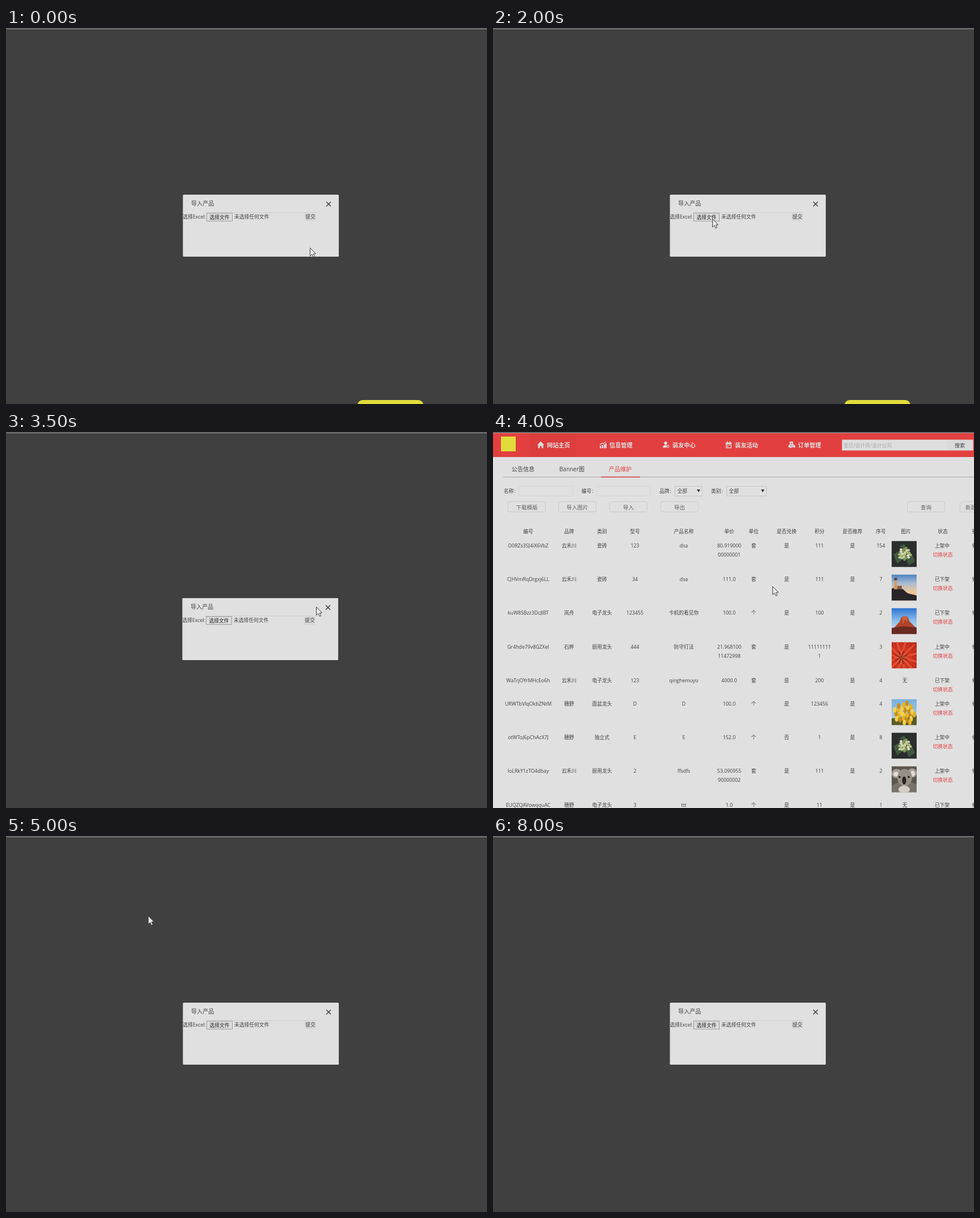
Recreate the animation shown at these times as an HTML page. Size 847 px wide and 661 px high, loop 9 s.

```html
<!DOCTYPE html>
<html lang="zh-CN">
<head>
<meta charset="utf-8">
<title>导入产品</title>
<style>
  html, body { margin: 0; width: 100%; height: 100%; overflow: hidden; background: #404040; }
  svg { display: block; }
  text { font-family: "Open Sans", "Noto Sans CJK SC", "Noto Sans CJK JP", "Noto Sans CJK", sans-serif; white-space: pre; }
</style>
</head>
<body>
<svg id="stage" width="847" height="661" viewBox="0 0 847 661"></svg>
<script>
const INK = '#404040', PAPER = '#e0e0e0', RED = '#e24040', FAINT = '#cacaca';

const rect = (x, y, w, h, fill, extra = '') =>
  `<rect x="${x}" y="${y}" width="${w}" height="${h}" fill="${fill}" ${extra}/>`;
const box = (x, y, w, h, stroke = FAINT, extra = '') =>
  rect(x + .5, y + .5, w - 1, h - 1, 'none', `stroke="${stroke}" ${extra}`);
const path = (d, fill, extra = '') => `<path d="${d}" fill="${fill}" ${extra}/>`;
const oval = (cx, cy, rx, ry, fill, extra = '') =>
  `<ellipse cx="${cx}" cy="${cy}" rx="${rx}" ry="${ry}" fill="${fill}" ${extra}/>`;
// y is the vertical middle of the line
const text = (x, y, str, size = 8.75, fill = INK, extra = '') =>
  `<text x="${x}" y="${y + size * .37}" font-size="${size}" fill="${fill}" ${extra}>${str}</text>`;
const centered = (x, y, str, size, fill, extra = '') => text(x, y, str, size, fill, `text-anchor="middle" ${extra}`);
const repeat = (count, draw) => Array.from({ length: count }, (_, i) => draw(i, i * 360 / count)).join('');
const gradient = (id, ...colors) => `<linearGradient id="${id}" x2="0" y2="1">${
  colors.map((color, i) => `<stop offset="${i / (colors.length - 1)}" stop-color="${color}"/>`).join('')}</linearGradient>`;
// Spiral of n small blobs around a centre
const cluster = (n, cx, cy, spread, rx, ry, colors) => repeat(n, i => {
  const r = spread * Math.sqrt(i / n), a = i * 2.4;
  return oval(cx + r * Math.cos(a), cy + r * Math.sin(a), rx, ry, colors[i % colors.length]);
});

// Thumbnails, 44 x 46
const photos = {
  hydrangea: rect(0, 0, 44, 46, '#2a2e2c')
    + path('M3 24L14 17L22 30L10 40ZM26 32L36 24L41 36L30 43ZM13 10L22 5L27 15Z', '#41583f')
    + cluster(24, 23, 23, 11, 2.5, 2.2, ['#d8dcc0', '#aebd74', '#c6cfa0', '#7f9558']),
  lighthouse: rect(0, 0, 44, 46, 'url(#dusk)')
    + path('M0 25L8 22L20 26L28 33L44 37V46H0Z', '#28262a')
    + path('M4 26L5 10H9L10 26Z', '#d09a68') + rect(4.5, 6, 5, 4, '#5a3a34') + rect(10, 20, 8, 6, '#8a5a40'),
  desert: rect(0, 0, 44, 46, 'url(#sky)')
    + path('M4 35L14 24L18 15H28L31 23L42 34Z', '#b04428')
    + path('M18 15H28L27 25L23 20L20 28Z', '#cc6038') + path('M0 35L20 32L44 34V46H0Z', '#6a2a22'),
  chrysanthemum: rect(0, 0, 44, 46, '#b82c1c')
    + repeat(24, (i, a) => oval(17, 10, 2.2, 17, i % 2 ? '#e44c30' : '#cc3420', `transform="rotate(${a} 17 27)"`))
    + repeat(16, (i, a) => oval(17, 20, 1.4, 6, i % 2 ? '#9c2818' : '#e0583a', `transform="rotate(${a} 17 27)"`))
    + cluster(9, 17, 27, 4, 1.3, 1.3, ['#7a2416', '#a8602c']),
  tulips: rect(0, 0, 44, 46, 'url(#spring)') + path('M0 34L44 28V46H0Z', '#5c5a28')
    + cluster(26, 23, 25, 19, 3, 5, ['#e6b422', '#f2d24a', '#c88c1a']),
  koala: rect(0, 0, 44, 46, '#5c574c') + path('M0 34L12 28H34L44 32V46H0Z', '#77716a')
    + oval(9, 13, 9, 8, '#a8a098') + oval(36, 12, 8, 8, '#a8a098')
    + oval(8, 14, 5, 4, '#e2dcd2') + oval(37, 13, 4, 5, '#e2dcd2')
    + oval(23, 20, 13, 15, '#968f88') + oval(22, 25, 3.5, 7, '#242020')
    + oval(14, 19, 1.8, 1.8, '#241e1a') + oval(30, 19, 1.8, 1.8, '#241e1a') + oval(22, 41, 10, 7, '#d2ccc4'),
};
const photo = (name, x, y) => `<svg x="${x}" y="${y}" width="44" height="46" overflow="hidden">${photos[name]}</svg>`;

// Navigation: label, text x, icon drawn in a 12 x 12 box
const nav = [
  ['网站主页', 95, path('M6 0L12 6H10.5V12H7.5V8H4.5V12H1.5V6H0Z', PAPER)],
  ['信息管理', 205, path('M0 8H2.5V12H0ZM3.5 6.5H6V12H3.5ZM7 5H9.5V12H7ZM10 3.5H12V12H10Z', PAPER)
    + path('M0 6L4 3L6 4L11 .5', 'none', `stroke="${PAPER}" stroke-width="1.2"`)],
  ['装友中心', 316, oval(5, 3, 2.6, 3, PAPER) + path('M0 11Q0 6.5 5 6.5L7 7L6 11Z', PAPER)
    + oval(9, 9, 1.8, 1.8, 'none', `stroke="${PAPER}" stroke-width="1.2"`)],
  ['装友活动', 426, path('M1 2H11V12H1ZM2.3 5V10.7H9.7V5Z', PAPER, 'fill-rule="evenodd"')
    + path('M3 0H4.5V3H3ZM7.5 0H9V3H7.5ZM3.3 6H5.3V7.6H3.3ZM6.6 6H8.6V7.6H6.6ZM3.3 8.4H5.3V10H3.3Z', PAPER)],
  ['订单管理', 537, path('M2 1L8 0L9 6L12 7V11L6 10L5 12L0 10L1 6L3 5Z', PAPER)
    + path('M4 3H7M4 5H7M3 8H8', 'none', `stroke="${RED}" stroke-width=".8"`)],
];

const columns = [62, 134, 192, 250, 336, 416, 459, 517, 575, 633, 683, 725];
const heads = '编号 品牌 类别 型号 产品名称 单价 单位 是否兑换 积分 是否推荐 序号 图片'.split(' ');
// A slash breaks a cell into lines; the last field says whether the item is on sale
const rows = [
  [200, 'O0RZs35J4iX6VbZ 云禾川 瓷砖 123 dsa 80.919000/00000001 套 是 111 是 154 hydrangea 1'],
  [259, 'CJHVmRqDrgxj6LL 云禾川 瓷砖 34 dsa 111.0 套 是 111 是 7 lighthouse 0'],
  [318, 'kuW8SBzz3DcJlBT 岚舟 电子龙头 123455 卡机的看见你 100.0 个 是 100 是 2 desert 0'],
  [378, 'Gr4hde79v8GZXel 石畔 厨用龙头 444 防守打法 21.968100/11472998 套 是 11111111/1 是 3 chrysanthemum 1'],
  [437, 'WaTrjOYrMHcEo6h 云禾川 电子龙头 123 qinghemuyu 4000.0 套 是 200 是 4 无 0'],
  [478, 'URWTbVlqOkbZNtM 穗野 面盆龙头 D D 100.0 个 是 123456 是 4 tulips 1'],
  [537, 'otWToJ6pChAcX7J 穗野 独立式 E E 152.0 个 否 1 是 8 hydrangea 1'],
  [596, 'IoLRkY1zTO4dbay 云禾川 厨用龙头 2 ffsdfs 53.090955/90000002 套 是 111 是 2 koala 1'],
  [656, 'EUQZQAVowqquAC 穗野 电子龙头 3 ttt 1.0 个 是 11 是 1 无 0'],
];

function tableRow([y, line]) {
  const cells = line.split(' '), onSale = cells.pop() === '1';
  return cells.map((cell, i) => photos[cell]
    ? photo(cell, 702, y - 8.5)
    : cell.split('/').map((part, n) => centered(columns[i], y + n * 16, part)).join('')).join('')
    + centered(791, y, onSale ? '上架中' : '已下架')
    + centered(792, y + 16, '切换状态', 8.75, RED) + text(843.5, y, '修改');
}

const button = (x, label, labelX) => box(x, 122, 67, 19, FAINT, 'rx="3"')
  + (labelX ? text(labelX, 132, label, 9.5, '#606060') : centered(x + 33.5, 132, label, 9.5, '#606060'));
const select = (x, w) => box(x, 95, w, 18, '#c4c4c4')
  + text(x + 4.5, 104, '全部') + path(`M${x + w - 10} 101h6l-3 5z`, '#333');
const field = (x, label, labelX) => text(labelX, 104, label) + text(labelX + 18.5, 104, ':')
  + box(x, 95, 96, 18, '#d0d0d0', 'stroke-dasharray="2 1"');
const choice = (x, w, label, labelX) => text(labelX, 104, label) + text(labelX + 18.5, 104, ':') + select(x, w);

const page = rect(0, 0, 847, 661, PAPER) + rect(0, 2, 847, 42, RED) + rect(65, 2, 81, 42, '#de3d3d')
  + rect(14, 8, 26, 26, '#e0dc3c')
  + nav.map(([label, x, icon]) => `<g transform="translate(${x - 17} 16.5)">${icon}</g>`
    + text(x, 23, label, 10.2, PAPER, 'font-weight="700"')).join('')
  + rect(614.5, 13.5, 231, 19, '#dedede') + rect(799, 14, 46, 18, '#dadada')
  + text(617, 23.5, '宝贝/设计师/设计公司', 8.75, '#a6a6a6') + centered(822, 23.5, '搜索', 9)
  + rect(18, 78.5, 829, 1.5, '#b8b8b8') + rect(190, 78.5, 69, 1.5, RED)
  + centered(53, 65, '公告信息', 10.1) + centered(139, 65, 'Banner图', 10.1) + centered(224, 65, '产品维护', 10.1, RED)
  + field(45, '名称', 19) + field(182, '编号', 156) + choice(320, 49, '品牌', 293) + choice(411, 71, '类别', 384)
  + [[26, '下载模版'], [115, '导入图片'], [205, '导入'], [295, '导出'], [729, '查询'], [822, '新建产品', 832]]
    .map(b => button(...b)).join('')
  + `<g id="hover">${rect(205, 122, 67, 19, RED, 'rx="3"')}${
    centered(238.5, 132, '导入', 9.5, '#f0f0f0', 'font-weight="700"')}</g>`
  + heads.map((head, i) => centered(columns[i] + (head === '图片' ? 2 : 0), 175, head)).join('')
  + centered(792, 175, '状态') + text(843.5, 175, '操作')
  + rows.map(tableRow).join('');

const dialog = rect(311.5, 293, 274.5, 109, PAPER, 'rx="1.5"')
  + text(326, 308.5, '导入产品', 10.1)
  + path('M564 305.5L572 313.5M572 305.5L564 313.5', 'none', 'stroke="#333" stroke-width="1.3"')
  + rect(352, 324, 194, 1, '#d0d0d0') + rect(526, 325, 20, 15, '#d9d9d9')
  + text(311.5, 332, '选择Excel:')
  + rect(353.5, 325.5, 45, 14, '#dcdcdc', 'id="file" stroke="#9c9c9c"')
  + centered(376, 332.5, '选择文件', 8.75, '#222') + text(402, 332, '未选择任何文件') + centered(536, 332, '提交');

stage.innerHTML = `<defs>${gradient('dusk', '#4c80c0', '#a8bcd4', '#f0c898', '#e0a070')}${
  gradient('sky', '#2c74d0', '#90c0ec', '#d8e4ec')}${gradient('spring', '#78b0e0', '#b8d4e8')}</defs>`
  + rect(0, 0, 847, 661, INK)
  + `<g id="page">${page}</g><g id="dialog">${dialog}</g>`
  + rect(619, 654, 116, 20, '#e0dc3c', 'id="tab" rx="9"')
  + rect(0, 0, 847, 1, INK) + rect(0, 1, 847, 1, '#a0a0a0')
  + `<g id="cursor">${path('M.5 .5V15L3.8 12L6.2 17L8.6 16L6.3 11H10.6Z', '#eaeaea', `stroke="${INK}"`)}</g>`;

// Pointer position in each half second; it is hidden afterwards
const STEP = 500, LOOP = 9000;
const pointer = [[535, 386], [253, 259], [202, 138], [205, 130], [386, 335], [386, 335],
  [556, 303], [546, 307], [492, 271], [250, 140], [250, 140]];
const el = id => document.getElementById(id);
const show = (id, on) => el(id).setAttribute('display', on ? 'inline' : 'none');

function frame(now) {
  const step = Math.floor(now % LOOP / STEP), onPage = step === 8 || step === 9;
  show('page', onPage);
  show('dialog', !onPage);
  show('hover', step === 9);
  show('tab', step < 7);
  show('cursor', step < pointer.length);
  if (pointer[step]) el('cursor').setAttribute('transform', `translate(${pointer[step]})`);
  el('dialog').setAttribute('transform', step === 7 ? 'translate(-1 -1)' : '');
  el('file').setAttribute('fill', step === 5 ? '#d0d0d0' : '#dcdcdc');
  requestAnimationFrame(frame);
}
frame(performance.now());
</script>
</body>
</html>
```
